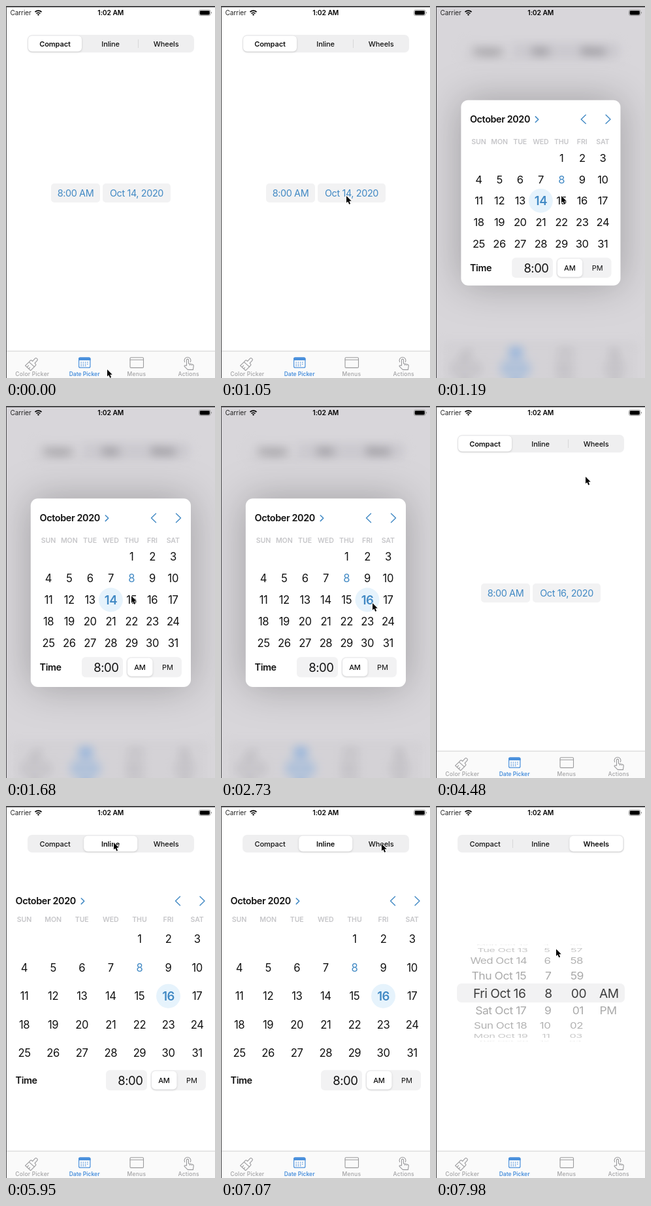
Write an HTML page that moves like this. It is 320x568 px and loops after 8000 ms.

```html
<!DOCTYPE html>
<html lang="en">
<head>
<meta charset="utf-8">
<title>Date picker styles</title>
<style>
  html, body { margin: 0; width: 100%; height: 100%; overflow: hidden; background: #fff; }
  svg { display: block; width: 320px; height: 568px; overflow: hidden; }
  text { font-family: Inter, "Liberation Sans", sans-serif; white-space: pre; }
  .icon { fill: none; stroke: #9a9a9c; stroke-width: 1.1; stroke-linejoin: round; stroke-linecap: round; }
  .chevron { fill: none; stroke: #4189c4; stroke-linecap: round; stroke-linejoin: round; }
  .raised { fill: #fff; filter: drop-shadow(0 1px 1.5px rgba(0, 0, 0, .16)); }
  #app { transform-origin: 160px 284px; }
  #card { fill: #fff; filter: drop-shadow(0 0 30px rgba(0, 0, 0, .26)); }
</style>
</head>
<body>
<svg viewBox="0 0 320 568">
  <g id="app">
    <g id="segments"></g>
    <g id="compact"></g>
    <g id="inline"></g>
    <g id="wheels"></g>
    <g id="tabs">
      <rect y="527" width="320" height="41" fill="#fafafa"/>
      <rect y="526.6" width="320" height=".8" fill="#c4c4c6"/>
      <g class="icon">
        <g transform="translate(40 546.5) rotate(42)">
          <path d="M-5.5 1V-2Q-5.5-3.5-4-3.5H-2.3V-9Q-2.3-11 0-11T2.3-9V-3.5H4Q5.5-3.5 5.5-2V1ZM-5.5 1L-6 9H5L5.5 1M-2.4 9V5.5M1.2 9V6.5"/>
        </g>
        <rect x="190" y="536.8" width="20.5" height="15.6" rx="1.5"/>
        <path d="M190 540.3H210.5"/>
        <path d="M276.5 549V540.6a1.5 1.5 0 0 1 3 0V546l6 1.2q2 .5 1.7 2.6l-.8 5.6h-8l-5.2-5q-.6-1.6 1.2-1.6zM281.6 546.4v2M284.3 547v1.6M273.6 543.6a5 5 0 1 1 8.8 0"/>
      </g>
      <g fill="#4a90dc">
        <path d="M113 536.5h14.5q2 0 2 2V541h-18.5v-2.5q0-2 2-2z"/>
        <rect x="111.6" y="537.2" width="17.3" height="15" rx="2" fill="none" stroke="#4a90dc" stroke-width="1.2"/>
        <path d="M114.5 544.2H127M114.5 546.8H127M114.5 549.4H124" stroke="#4a90dc" stroke-width="1.3" stroke-dasharray="1.4 1.8"/>
      </g>
    </g>
    <!-- the blurred backdrop mirrors its content at the bottom edge -->
    <use href="#tabs" transform="translate(0 1136) scale(1 -1)"/>
  </g>
  <rect id="dim" width="320" height="568" fill="rgba(48,40,62,.19)"/>
  <g id="popover">
    <rect id="card" x="37.8" y="141.3" width="245.2" height="287.7" rx="11"/>
    <g id="popoverContent"></g>
  </g>
  <g id="status">
    <g fill="none" stroke="#000" stroke-width="1.7">
      <path d="M44.5 9.2a7 7 0 0 1 10 0M46.5 11.5a4.2 4.2 0 0 1 6 0"/>
    </g>
    <path d="M49.5 14.8L47.8 13a2.5 2.5 0 0 1 3.4 0z"/>
    <rect x="295.5" y="6" width="17.5" height="8.6" rx="2.4" fill="none" stroke="#8a8a8a" stroke-width=".8"/>
    <rect x="296.7" y="7.2" width="15.1" height="6.2" rx="1.4"/>
    <path d="M314 9v2.6q1.2-.4 1.2-1.3T314 9z" fill="#8a8a8a"/>
  </g>
  <path d="M0 0H320V2H1V568H0Z" fill="#4a4a4c"/>
  <path id="cursor" d="M0 0V10.6L2.4 8.4 4.2 12.8 6.1 12 4.3 7.7H7.7Z" stroke="#fff" stroke-width="1.2" paint-order="stroke"/>
</svg>
<script>
const $ = id => document.getElementById(id);
const BLUE = '#4189c4', INK = '#111', FILL = '#f2f2f3', MUTED = '#c6c6c9';
const CAP = .364; // half the cap height, in em

function add(parent, tag, attrs, content = '') {
  const node = document.createElementNS('http://www.w3.org/2000/svg', tag);
  for (const name in attrs) node.setAttribute(name, attrs[name]);
  node.textContent = content;
  return parent.appendChild(node);
}

// y is the vertical middle of the capitals
function label(parent, x, y, content, size, { weight = 400, fill = INK, anchor = 'middle', ...rest } = {}) {
  return add(parent, 'text', {
    x, y: y + size * CAP, 'font-size': size, 'font-weight': weight, fill, 'text-anchor': anchor,
    'letter-spacing': size > 12 ? '-.026em' : '-.008em', ...rest
  }, content);
}

const box = (parent, x, y, width, height, rx, fill = FILL) =>
  add(parent, 'rect', { x, y, width, height, rx, fill });

const raised = (parent, x, y, width, height) =>
  add(parent, 'rect', { x, y, width, height, rx: 6, class: 'raised' });

const chevron = (parent, x, y, w, h, width) => add(parent, 'path', {
  d: `M${x - w / 2} ${y - h / 2}l${w} ${h / 2}l${-w} ${h / 2}`, class: 'chevron', 'stroke-width': width
});

// Month grid for October 2020 with a time row; returns a function that selects a day
function calendar(parent, o) {
  label(parent, o.left, o.head, 'October 2020', 14.4, { weight: 600, anchor: 'start' });
  chevron(parent, o.left + 103, o.head + .3, 4.4, 8.6, 1.6);
  chevron(parent, o.prev, o.head, -7, 13.4, 1.4);
  chevron(parent, o.next, o.head, 7, 13.4, 1.4);
  ['SUN', 'MON', 'TUE', 'WED', 'THU', 'FRI', 'SAT'].forEach((name, i) =>
    label(parent, o.x + o.dx * i, o.week, name, 10.6, { weight: 600, fill: MUTED }));

  const place = d => [o.x + o.dx * ((d + 3) % 7), o.y + o.dy * Math.floor((d + 3) / 7)];
  const disc = add(parent, 'circle', { r: 18.5, fill: '#e6f3fc' });
  const days = Array.from({ length: 31 }, (_, i) => label(parent, ...place(i + 1), i + 1, 16.6));

  label(parent, o.left, o.time, 'Time', 14.4, { weight: 600, anchor: 'start' });
  const top = o.time - 15.2;
  box(parent, o.field, top, 63, 31, 6);
  label(parent, o.field + 56.5, o.time + .5, '8:00', 18.5, { anchor: 'end' });
  box(parent, o.field + 68.5, top, 84.5, 31, 7);
  raised(parent, o.field + 70, top + 1.5, 38.5, 28);
  label(parent, o.field + 89, o.time + .5, 'AM', 11, { weight: 500 });
  label(parent, o.field + 131.5, o.time + .5, 'PM', 11);

  return selected => {
    const [cx, cy] = place(selected);
    disc.setAttribute('cx', cx);
    disc.setAttribute('cy', cy);
    days.forEach((node, i) => {
      const on = i + 1 === selected, size = on ? 18.5 : 16.6;
      node.setAttribute('font-weight', on ? 600 : 400);
      node.setAttribute('font-size', size);
      node.setAttribute('y', place(i + 1)[1] + size * CAP);
      node.setAttribute('fill', on || i === 7 ? BLUE : INK);
    });
  };
}

// Status bar and tab labels
label($('status'), 6.5, 10.7, 'Carrier', 10, { anchor: 'start', fill: '#222' });
label($('status'), 160.3, 10.7, '1:02 AM', 10.3, { weight: 600, fill: '#000' });
['Color Picker', 'Date Picker', 'Menus', 'Actions'].forEach((name, i) =>
  label($('tabs'), 40.3 + 79.8 * i, 562.3, name, 8.5, i === 1
    ? { weight: 600, fill: '#4a90dc', 'letter-spacing': 0 }
    : { weight: 500, fill: '#a2a2a4', 'letter-spacing': '.025em' }));

// Segmented control
box($('segments'), 33, 44, 255, 27, 7, '#efeff0');
const separators = [117.5, 202.5].map(x => box($('segments'), x - .4, 51, .8, 13, 0, '#d2d2d4'));
const thumb = raised($('segments'), 34, 45.5, 82, 24);
const titles = ['Compact', 'Inline', 'Wheels'].map((name, i) =>
  label($('segments'), 75 + 85.1 * i, 57.7, name, 11));

// Compact style
box($('compact'), 69, 271, 75, 29, 5);
box($('compact'), 148, 271, 104, 29, 5);
label($('compact'), 106.5, 285.6, '8:00 AM', 14.4, { fill: BLUE });
const dateButton = label($('compact'), 200, 285.6, '', 14.4, { fill: BLUE });

// Both calendars
const selectInline = calendar($('inline'), {
  left: 14.5, head: 145, prev: 263, next: 300.5, week: 173,
  x: 28, dx: 44.1, y: 203, dy: 43.6, time: 418.5, field: 153
});
const selectPopover = calendar($('popoverContent'), {
  left: 51.5, head: 171, prev: 226, next: 264, week: 205.5,
  x: 65, dx: 31.8, y: 230, dy: 33, time: 398.5, field: 116
});
selectInline(16);

// Wheels: rows sit on a cylinder seen from the front
box($('wheels'), 32, 271, 257, 29, 7);
for (let k = -4; k <= 4; k++) {
  const angle = .365 * k, n = Math.abs(k);
  const row = (x, content) => label($('wheels'), 0, 0, content, k ? 17.5 : 19.2, {
    anchor: 'end', fill: '#333', opacity: [.95, .42, .38, .28, .08][n],
    transform: `translate(${x} ${285.6 + 74.2 * Math.sin(angle)}) scale(${k ? 1.035 - .035 * n : 1} ${Math.cos(angle)})`
  });
  const date = 16 + k;
  row(137.3 + n, `${['Sun', 'Mon', 'Tue', 'Wed', 'Thu', 'Fri', 'Sat'][(date + 3) % 7]} Oct ${date}`);
  row(177.5 - n, 8 + k);
  row(k ? 227 - n : 230, String((60 + k) % 60).padStart(2, '0'));
  if (k === 0 || k === 1) row(k ? 276.5 : 279.5, k ? 'PM' : 'AM');
}

const progress = (t, from, to) => Math.min(1, Math.max(0, (t - from) / (to - from)));
const ease = u => u * u * (3 - 2 * u);
const show = (id, on) => $(id).style.display = on ? '' : 'none';

// Pointer moves: start, end, target
const moves = [
  [0, 630, 192, 290], [1820, 2240, 232, 301], [3150, 3850, 229, 108],
  [4480, 4830, 165, 56], [6230, 6790, 246, 58], [7560, 7980, 184, 218.5]
];

function drawPopover(t) {
  const closing = progress(t, 4060, 4410);
  const visible = t < 4060 ? ease(progress(t, 1050, 1190)) : 1 - ease(closing);
  const s = t < 4060 ? 1 - .9 * Math.exp(-Math.max(0, t - 1050) / 35) : .985 - .5 * closing ** 2;
  const wide = Math.min(1, s + .012); // the card settles in width before height
  const scaleTo = (id, kx, ky, dy) =>
    $(id).setAttribute('transform', `translate(160.4 ${285.2 + dy}) scale(${kx} ${ky}) translate(-160.4 -285.2)`);
  scaleTo('card', wide, s, 0);
  scaleTo('popoverContent', wide, wide, Math.min(1.4, (1 - s) * 100));
  show('popover', visible > 0);
  $('popover').style.opacity = visible;
  $('dim').style.opacity = visible;
  $('app').style.filter = visible ? `blur(${8 * visible}px) saturate(${1 + .6 * visible})` : 'none';
  $('app').style.transform = visible ? `scale(${1 - .05 * visible})` : 'none';
}

function draw(t) {
  const style = t < 5180 ? 0 : t < 7210 ? 1 : 2;
  ['compact', 'inline', 'wheels'].forEach((id, i) => show(id, i === style));
  titles.forEach((node, i) => node.setAttribute('font-weight', i === style ? 600 : 500));
  separators.forEach((node, i) => node.style.display = style === i || style === i + 1 ? 'none' : '');
  thumb.setAttribute('x', 34 + 85.2 * (ease(progress(t, 5110, 5530)) + ease(progress(t, 7140, 7490))));

  const day = t < 2520 ? 14 : 16;
  selectPopover(day);
  dateButton.textContent = `Oct ${day}, 2020`;
  drawPopover(t);

  let x = 155, y = 555;
  for (const [from, to, tx, ty] of moves) {
    const u = ease(progress(t, from, to));
    x += (tx - x) * u;
    y += (ty - y) * u;
  }
  $('cursor').setAttribute('transform', `translate(${x} ${y})`);
}

const STEP = 70, LOOP = 8000;
function tick() {
  draw(Math.floor(performance.now() % LOOP / STEP) * STEP);
  requestAnimationFrame(tick);
}
tick();
</script>
</body>
</html>
```
